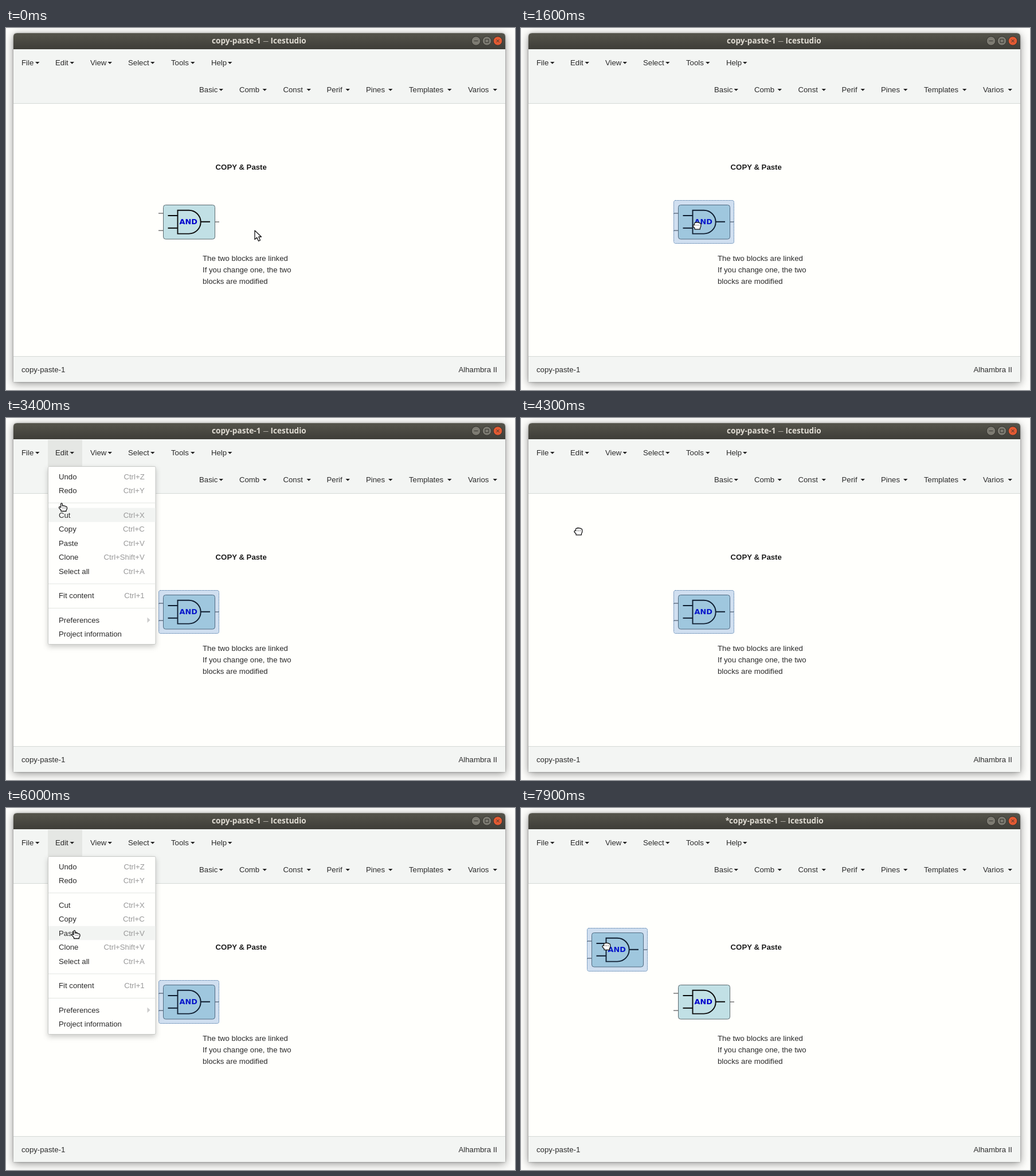
An HTML page that plays this animation: 888x631 px, repeating every 8 s.

```html
<!DOCTYPE html>
<html lang="en">
<head>
<meta charset="utf-8">
<title>Copy and paste</title>
<style>
html, body { margin: 0; width: 100%; height: 100%; overflow: hidden; background: #fdfdfb; }
#win { position: absolute; left: 13px; top: 9px; width: 858px; height: 608px; border-radius: 6px 6px 0 0;
  box-shadow: 0 3px 15px rgba(0,0,0,.42), 0 0 3px rgba(0,0,0,.35); }
svg { position: absolute; left: 0; top: 0; display: block; }
text { font: 13.2px "Liberation Sans", Arial, sans-serif; fill: #2b2b2b; white-space: pre; }
.bold { font-weight: bold; fill: #1c1c1c; }
.key { fill: #999; text-anchor: end; }
.end { text-anchor: end; }
.title text { font: bold 13.6px "Open Sans", "Noto Sans", sans-serif; fill: #dfdbd2; }
.title .dash { font-size: 9.5px; font-weight: normal; }
.and { font: bold 12.8px "DejaVu Sans", Verdana, sans-serif; fill: #0000cd; }
.sel { fill: rgba(36,107,195,.21); stroke: #4473a6; }
.dots { stroke-dasharray: 1.5 1; }
.cursor { fill: #fff; stroke: #151515; stroke-width: 1.3; stroke-linejoin: round; }
#menu { filter: drop-shadow(0 4px 5px rgba(0,0,0,.2)); }
</style>
</head>
<body>
<div id="win"></div>
<svg width="888" height="631" viewBox="0 0 888 631">
  <defs>
    <linearGradient id="bar" x2="0" y2="1">
      <stop offset="0" stop-color="#55544b"/><stop offset="1" stop-color="#3e3d38"/>
    </linearGradient>
    <g id="block">
      <path d="M266 323H274M266 353H274M365 338H372" stroke="#777" stroke-width="1.3"/>
      <rect x="274.5" y="308.5" width="90" height="59.5" rx="4" fill="#c1e0e5" stroke="#5d6b70"/>
      <path d="M282.5 327H299M282.5 348.7H299M340 337.8H356M299.5 317.8V358.6H319A20.7 20.4 0 0 0 319 317.8Z"
        fill="none" stroke="#0a0a0a" stroke-width="1.9"/>
      <text class="and" x="302.6" y="342.2">AND</text>
    </g>
    <rect id="halo" class="sel dots" x="266.5" y="300.5" width="105" height="75" rx="3"/>
  </defs>

  <path d="M13 37V15Q13 9 19 9H865Q871 9 871 15V37Z" fill="url(#bar)"/>
  <path d="M13 37H871V617H13Z" fill="#f3f5f3"/>
  <path d="M13 132H871V572H13Z" fill="#fffffc"/>
  <path d="M13 131.5H871M13 572.5H871" stroke="#d5d9d6"/>
  <g class="title">
    <text id="star" x="356.5" y="27">*</text>
    <g id="name">
      <text x="359" y="27">copy-paste-1</text>
      <text class="dash" x="448.5" y="25.5">—</text>
      <text x="461.5" y="27">Icestudio</text>
    </g>
  </g>
  <g stroke="#35342f">
    <circle cx="820" cy="22.5" r="7.8" fill="#7d7b72"/>
    <circle cx="839" cy="22.5" r="7.8" fill="#7d7b72"/>
    <circle cx="858" cy="22.5" r="7.8" fill="#e35a33"/>
    <path d="M816.5 22.5H823.5M836 19.5H842V25.5H836ZM855.5 20L860.5 25M860.5 20L855.5 25" fill="none"/>
  </g>
  <rect id="tab" x="73" y="38" width="60" height="46" fill="#e5e7e4"/>
  <g id="nav"></g>
  <text x="27" y="599.7">copy-paste-1</text>
  <text class="end" x="857" y="599.7">Alhambra II</text>

  <text class="bold" x="365.6" y="247">COPY &amp; Paste</text>
  <text x="343" y="406">The two blocks are linked</text>
  <text x="343" y="426">If you change one, the two</text>
  <text x="343" y="445.7">blocks are modified</text>
  <use href="#block"/>
  <use id="picked" href="#halo"/>
  <g id="copy" transform="translate(-151 -91)"><use href="#block"/><use href="#halo"/></g>
  <rect id="band" class="sel" x="223.5" y="273.5"/>

  <g id="menu">
    <rect x="73.5" y="84.5" width="187.5" height="310" rx="2" fill="#fffffd" stroke="#c6c8c5"/>
    <rect id="row" x="74" width="186.5" height="24.5" fill="#f2f4f2"/>
    <path d="M74 148H260.500M74 289H260.500M74 331.500H260.500" stroke="#e3e5e2"/>
    <path d="M246.500 347.500V357L251.500 352.200Z" fill="#ccc"/>
    <g id="items"></g>
  </g>

  <g class="cursor">
    <path id="arrow" d="M0 0V15.500L3.700 12.200L6.500 18.300L9.500 17L6.800 11H11.500Z"/>
    <g id="fist">
      <path d="M-4 6.300V4.200L-6.800 1.500Q-7.600-.8-6-1.200L-4.500-.8V-3.500Q-4.300-5.500-2-5.200Q-.5-6.800 1.200-5.300Q3-6.200 4-4.600Q6.700-4.800 6.700-2.200V1.500L5.400 4.200V6.300Z"/>
      <path d="M-2-1.500V-.3M.7-1.500V-.3M3.400-1.500V-.3" stroke-width="1"/>
    </g>
    <g id="point">
      <path d="M-3.500 7V5.200L-6.800 1.600Q-7.500-.6-5.700-.8L-3.900.5V-6Q-2.600-8.400-1.200-6V-2.300L1-2.500L3.500-1.900L5.800-1.200Q7-.8 6.900.6V3L5.500 5.200V7Z"/>
      <path d="M-.7.700V1.900M1.600.7V1.900M3.900.7V1.900" stroke-width="1"/>
    </g>
  </g>
</svg>
<script>
const $ = id => document.getElementById(id);
const LOOP = 8000, STEP = 100, ROW = 24.5;

function add(parent, tag, attrs, text = "") {
  const el = document.createElementNS("http://www.w3.org/2000/svg", tag);
  for (const k in attrs) el.setAttribute(k, attrs[k]);
  el.textContent = text;
  $(parent).append(el);
}

// label, text x, caret x
function navRow(y, entries) {
  for (const [label, x, caret] of entries) {
    add("nav", "text", { x, y }, label);
    add("nav", "path", { d: `M${caret} ${y - 6}h7.500l-3.750 3.800z`, fill: "#222" });
  }
}
navRow(65, [["File", 27, 51], ["Edit", 86, 111.5], ["View", 147, 177.5],
  ["Select", 213, 252], ["Tools", 288, 322], ["Help", 358, 387]]);
navRow(112, [["Basic", 337, 371.5], ["Comb", 407, 447.5], ["Const", 483.5, 524.5], ["Perif", 559.5, 592.5],
  ["Pines", 628, 667], ["Templates", 703, 770], ["Varios", 806, 849.5]]);

// label, shortcut, middle of the row
const items = [["Undo", "Ctrl+Z", 102], ["Redo", "Ctrl+Y", 126.5], ["Cut", "Ctrl+X", 169],
  ["Copy", "Ctrl+C", 193.5], ["Paste", "Ctrl+V", 218], ["Clone", "Ctrl+Shift+V", 242.5],
  ["Select all", "Ctrl+A", 267], ["Fit content", "Ctrl+1", 309.7],
  ["Preferences", "", 352], ["Project information", "", 376.7]];
for (const [label, key, mid] of items) {
  add("items", "text", { x: 92, y: mid + 4.7 }, label);
  add("items", "text", { x: 241.7, y: mid + 4.7, class: "key" }, key);
}

// pointer: time, x, y
const path = [[0, 434, 353], [300, 434, 353], [1000, 223, 272], [1100, 238, 286], [1200, 267, 312],
  [1300, 295, 337.5], [1400, 303, 342], [1500, 307, 344.5], [1900, 307, 344.5], [2400, 105.5, 69.5],
  [3000, 105.5, 69.5], [3400, 99.5, 155.5], [3700, 100, 197.5], [4600, 100, 197.5], [5100, 104.5, 62],
  [5300, 104.5, 62], [5500, 100.5, 111.5], [5600, 100.5, 111.5], [6000, 122, 220.5], [6600, 122, 220.5],
  [6700, 122.5, 215.5], [7000, 122.5, 215.5], [7400, 342, 306.5], [7500, 342, 306.5], [7900, 149, 241],
  [LOOP, 149, 241]];
const shapes = [[0, "arrow"], [1100, "fist"], [3100, "point"], [4300, "fist"], [5000, "point"], [6700, "fist"]];

function pointerAt(t) {
  const i = path.findIndex(k => k[0] > t);
  const [t0, x0, y0] = path[i - 1], [t1, x1, y1] = path[i];
  const p = (t - t0) / (t1 - t0), e = p * p * (3 - 2 * p);
  return [x0 + (x1 - x0) * e, y0 + (y1 - y0) * e];
}

const within = (t, from, to) => t >= from && t < to;
const show = (id, on) => { $(id).style.display = on ? "" : "none"; };

function draw(t) {
  const [x, y] = pointerAt(t);
  const shape = shapes.filter(s => s[0] <= t).pop()[1];
  for (const id of ["arrow", "fist", "point"]) show(id, id === shape);
  $(shape).setAttribute("transform", `translate(${x} ${y})`);

  show("band", within(t, 1100, 1600));
  $("band").setAttribute("width", Math.max(0, x - 223));
  $("band").setAttribute("height", Math.max(0, y - 275));

  const open = within(t, 2700, 4200) || within(t, 5100, 6600);
  show("menu", open);
  show("tab", open);
  const hot = items.find(it => Math.abs(y + 4 - it[2]) <= ROW / 2);
  show("row", hot && shape === "point");
  if (hot) $("row").setAttribute("y", hot[2] - ROW / 2);

  const pasted = t >= 6700;
  show("picked", within(t, 1600, 6700));
  show("copy", pasted);
  show("star", pasted);
  $("name").setAttribute("transform", `translate(${pasted ? 4 : 0} 0)`);
}

const start = performance.now();
let last = -1;
function tick() {
  const t = Math.floor((performance.now() - start) % LOOP / STEP) * STEP;
  if (t !== last) draw(last = t);
  requestAnimationFrame(tick);
}
tick();
</script>
</body>
</html>
```
